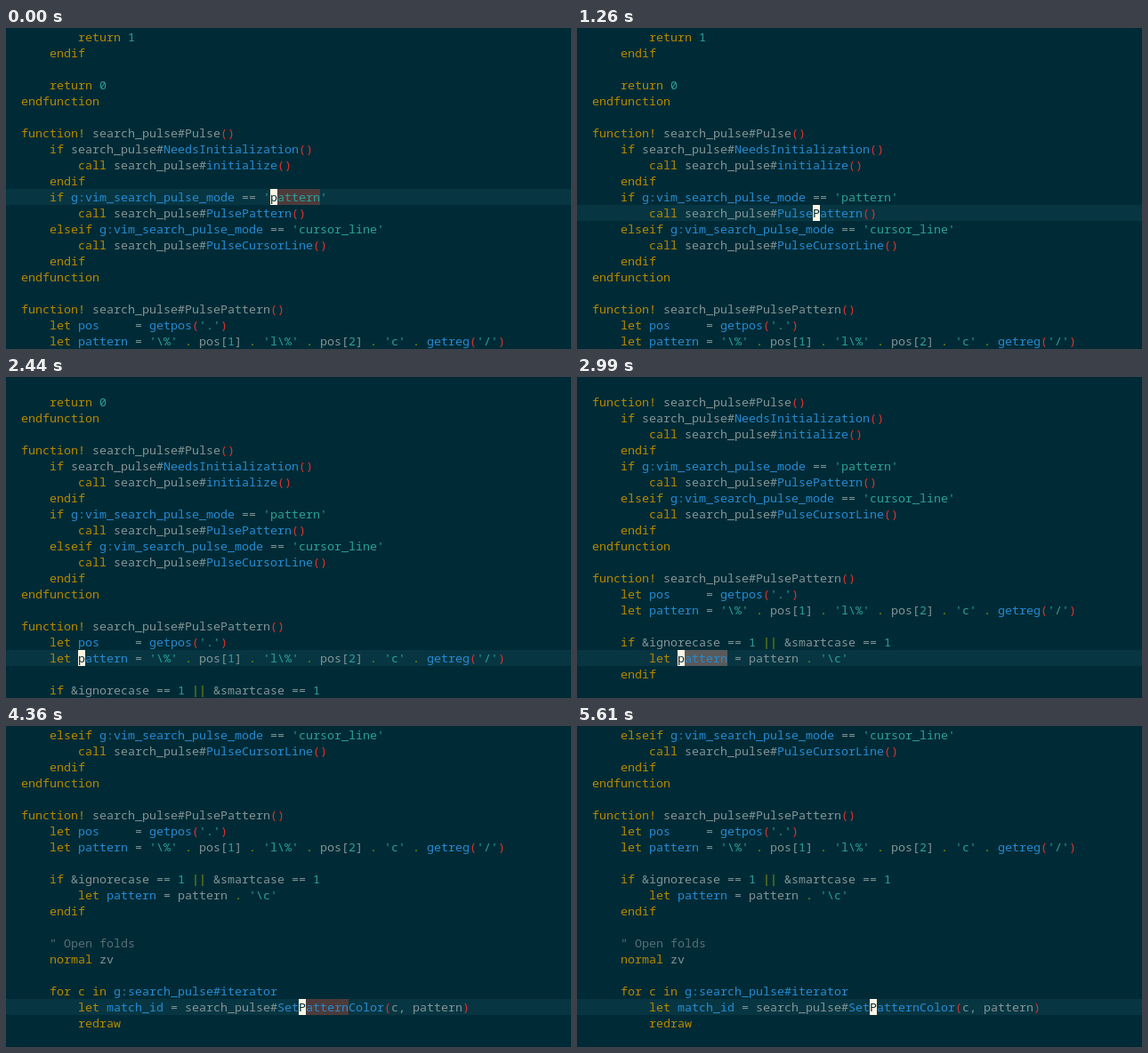
Animation, 635 px wide and 361 px high, one loop 5.92 s. Source, as an HTML page with a canvas:

```html
<!DOCTYPE html>
<html lang="en">
<head>
<meta charset="utf-8">
<title>Search pulse</title>
<style>
html, body { margin: 0; width: 100%; height: 100%; overflow: hidden; background: #002b36; }
canvas { display: block; }
</style>
</head>
<body>
<canvas id="stage" width="635" height="361"></canvas>
<script>
const ctx = document.getElementById('stage').getContext('2d');
const LOOP = 5920;
const LEFT = 17, TOP = 1, CELL = 8, ROW = 18, ROWS = 20, BASE = 14;

const color = {
  back: '#002b36', line: '#073642', plain: '#839496', note: '#586e75',
  word: '#b58900', name: '#268bd2', value: '#2aa198', paren: '#dc322f',
  oper: '#859900', cursor: '#fdf6e3', dim: '#4d3b3b', bright: '#585a5c'
};

const code = String.raw`        return 1
    endif

    return 0
endfunction

function! search_pulse#Pulse()
    if search_pulse#NeedsInitialization()
        call search_pulse#initialize()
    endif
    if g:vim_search_pulse_mode == 'pattern'
        call search_pulse#PulsePattern()
    elseif g:vim_search_pulse_mode == 'cursor_line'
        call search_pulse#PulseCursorLine()
    endif
endfunction

function! search_pulse#PulsePattern()
    let pos     = getpos('.')
    let pattern = '\%' . pos[1] . 'l\%' . pos[2] . 'c' . getreg('/')

    if &ignorecase == 1 || &smartcase == 1
        let pattern = pattern . '\c'
    endif

    " Open folds
    normal zv

    for c in g:search_pulse#iterator
        let match_id = search_pulse#SetPatternColor(c, pattern)
        redraw
`.split('\n');

// The first rule that matches at a position wins.
const rules = [
  [/".*/y, 'note'],
  [/'[^']*'/y, 'value'],
  [/(function!|endfunction|return|endif|elseif|if|call|let|normal|for c in|redraw)(?!\w)/y, 'word'],
  [/(?<=function! )[\w#]+/y, 'plain'],
  [/(?<=let )\w+|g:[\w#]+/y, 'name'],
  [/\w+#/y, 'plain'],
  [/[a-zA-Z]\w*(?=\()/y, 'name'],
  [/\d+/y, 'value'],
  [/[()]/y, 'paren'],
  [/\|\||\./y, 'oper'],
  [/\w+|./y, 'plain']
];

function tokenize(text) {
  const tokens = [];
  for (let col = 0; col < text.length;) {
    for (const [pattern, kind] of rules) {
      pattern.lastIndex = col;
      const match = pattern.exec(text);
      if (!match) continue;
      tokens.push({ col, text: match[0], kind });
      col += match[0].length;
      break;
    }
  }
  return tokens;
}
const lines = code.map(tokenize);

// Each stop: time, first visible line, cursor line, cursor column, pulse changes.
const stops = [
  { at: 0, scroll: 0, line: 10, col: 35, pulse: [[0, 'dim'], [120, '']] },
  { at: 860, scroll: 0, line: 11, col: 31, pulse: [[860, 'dim'], [1010, 'bright'], [1140, 'dim'], [1260, '']] },
  { at: 1400, scroll: 0, line: 17, col: 28, pulse: [[1400, 'dim'], [1520, 'bright'], [1640, 'dim'], [1760, '']] },
  { at: 2190, scroll: 2, line: 19, col: 8, pulse: [[2190, 'dim'], [2440, '']] },
  { at: 2990, scroll: 5, line: 22, col: 12, pulse: [[2990, 'bright'], [3230, '']] },
  { at: 3630, scroll: 5, line: 22, col: 22, pulse: [[3630, 'dim'], [3750, 'bright'], [3900, 'dim'], [4060, '']] },
  { at: 4360, scroll: 12, line: 29, col: 39, pulse: [[4360, 'dim'], [4510, 'bright'], [4630, 'dim'], [4780, '']] }
];

const colX = col => LEFT + col * CELL;

function fill(x, y, width, paint) {
  ctx.fillStyle = paint;
  ctx.fillRect(x, y, width, ROW);
}

function drawText(text, col, y, paint) {
  ctx.fillStyle = paint;
  [...text].forEach((char, i) => ctx.fillText(char, colX(col + i), y + BASE));
}

function draw(time) {
  const stop = stops.findLast(s => s.at <= time);
  const pulse = stop.pulse.findLast(p => p[0] <= time)[1];
  const y = TOP + (stop.line - stop.scroll) * ROW;

  ctx.fillStyle = color.back;
  ctx.fillRect(0, 0, 635, 361);
  fill(0, y, 635, color.line);
  if (pulse) fill(colX(stop.col), y, 7 * CELL, color[pulse]);

  ctx.font = '13.333px "Noto Sans Mono", "DejaVu Sans Mono", monospace';
  lines.slice(stop.scroll, stop.scroll + ROWS).forEach((tokens, row) => {
    for (const { col, text, kind } of tokens) drawText(text, col, TOP + row * ROW, color[kind]);
  });

  fill(colX(stop.col), y, CELL, color.cursor);
  drawText(code[stop.line][stop.col], stop.col, y, color.back);
}

const start = performance.now();
function tick() {
  draw((performance.now() - start) % LOOP);
  requestAnimationFrame(tick);
}
tick();
</script>
</body>
</html>
```
